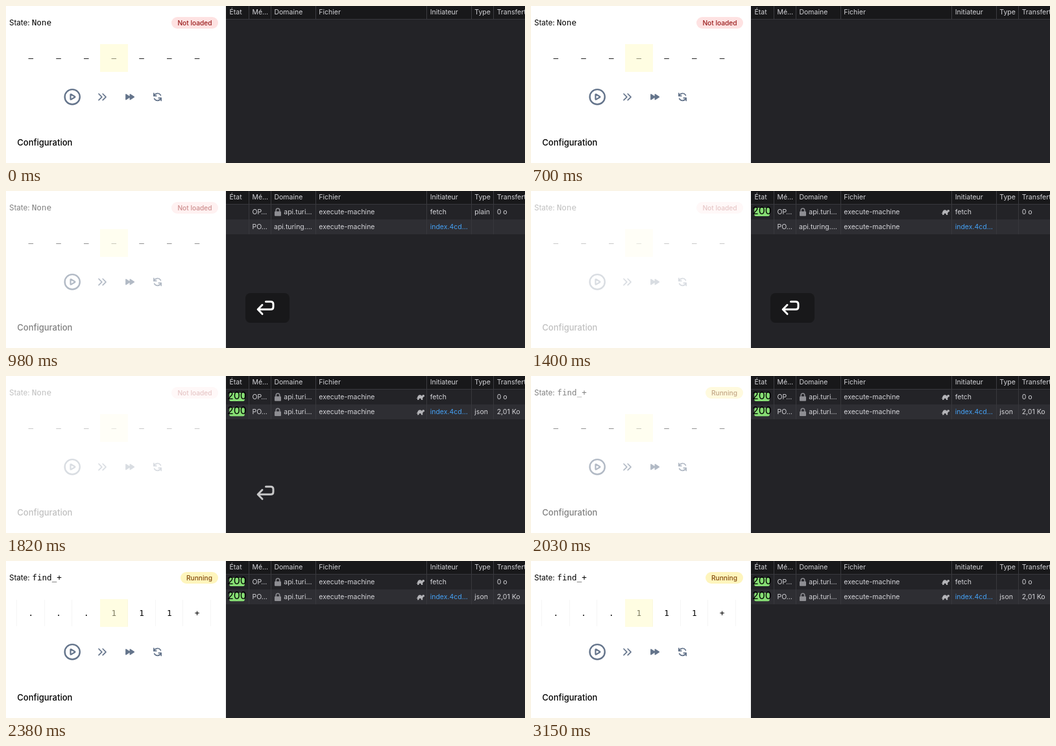
An HTML page that plays this animation: 800 by 243 pixels, repeating every 3.5 s.

```html
<!DOCTYPE html>
<html lang="fr">
<head>
<meta charset="utf-8">
<title>Machine and network panel</title>
<style>
  html, body { margin: 0; width: 100%; height: 100%; overflow: hidden; background: #fff; }
  svg { display: block; width: 100vw; height: 100vh; }
  text { font-family: Inter, "Open Sans", sans-serif; white-space: pre; }
  .mono { font-family: "DejaVu Sans Mono", monospace; font-size: 12.6px; }
  .mid { text-anchor: middle; }
  .state { font-size: 11.6px; }
  .badge { font-size: 10.2px; font-weight: 500; }
  .title { font-size: 13px; font-weight: 500; }
  .icons { fill: none; stroke: #64748b; stroke-width: 1.7; stroke-linecap: round; stroke-linejoin: round; }
  .net text { font-size: 10.5px; fill: #d4d4d8; }
  .net .code { font-size: 10.4px; font-weight: 700; fill: #15201a; }
  .net .link { fill: #45a1f5; }

  /* 2% of the loop is one 70 ms tick */
  .net, .rows, .app, .key, .plate, .sent1, .done1, .sent2, .done2,
  .idle, .running, .blank, .loaded { animation: 3.5s step-end infinite; }
  .app { animation-name: dim; }
  .key { animation-name: press; }
  .plate { animation-name: plate; }
  .rows { animation-name: rows; }
  .sent1 { animation-name: off1; }
  .done1 { animation-name: on1; }
  .sent2 { animation-name: off2; }
  .done2 { animation-name: on2; }
  .idle { animation-name: off3; }
  .running { animation-name: on3; }
  .blank { animation-name: off4; }
  .loaded { animation-name: on4; }

  @keyframes dim {
    0% { opacity: 1; }
    20% { opacity: 1; animation-timing-function: steps(6); }
    32% { opacity: .25; }
    54% { opacity: .25; animation-timing-function: steps(6); }
    66%, 100% { opacity: 1; }
  }
  @keyframes press {
    0% { opacity: 0; }
    22% { opacity: 0; animation-timing-function: steps(2); }
    26% { opacity: 1; }
    50% { opacity: 1; animation-timing-function: steps(4); }
    58%, 100% { opacity: 0; }
  }
  @keyframes plate {
    0% { opacity: 1; }
    46% { opacity: 1; animation-timing-function: steps(3); }
    52%, 100% { opacity: 0; }
  }
  @keyframes rows { 0% { opacity: 0; } 26%, 100% { opacity: 1; } }
  @keyframes off1 { 0% { opacity: 1; } 30%, 100% { opacity: 0; } }
  @keyframes on1 { 0% { opacity: 0; } 30%, 100% { opacity: 1; } }
  @keyframes off2 { 0% { opacity: 1; } 44%, 100% { opacity: 0; } }
  @keyframes on2 { 0% { opacity: 0; } 44%, 100% { opacity: 1; } }
  @keyframes off3 { 0% { opacity: 1; } 56%, 100% { opacity: 0; } }
  @keyframes on3 { 0% { opacity: 0; } 56%, 100% { opacity: 1; } }
  @keyframes off4 { 0% { opacity: 1; } 62%, 100% { opacity: 0; } }
  @keyframes on4 { 0% { opacity: 0; } 62%, 100% { opacity: 1; } }
</style>
</head>
<body>
<svg viewBox="0 0 800 243" preserveAspectRatio="none">
  <defs>
    <g id="lock">
      <path d="M416.2 32v-2.2a2.8 2.8 0 0 1 5.6 0V32" fill="none" stroke="#8e8e93" stroke-width="1.5"/>
      <rect x="414" y="31.5" width="10" height="7.3" rx="1" fill="#8e8e93"/>
    </g>
    <g id="turtle" fill="#b4b4b8">
      <path d="M634 34.2c.3-3.3 2-5 4-5s3.700 1.700 4 5z"/>
      <path d="M641 31.500q.3-2.500 2-2.500 2.200.2 2.200 2.100-.2 1.300-2 1.300l-1.200 2.300h-10q1.500-.4 2.300-1.200z"/>
      <path d="M634.500 34h2.500l-.6 3h-2.400zM639.500 34h2.500l.4 3H640z"/>
    </g>
    <g id="ok">
      <rect x="344.300" y="26" width="23.500" height="13" rx="2.500" fill="#86de74"/>
      <text class="code mid" x="356" y="36.300">200</text>
    </g>
    <path id="cols" d="M374.500 0v20M408.500 0v20M477.500 0v20M648.500 0v20M717.500 0v20M751.500 0v20"/>
  </defs>

  <rect width="340" height="243" fill="#fff"/>
  <g class="app">
    <text class="state" x="5" y="30.200">State:</text>
    <g class="idle">
      <text class="mono" x="39.700" y="30.200">None</text>
      <rect x="255" y="17" width="72" height="18" rx="9" fill="#fee2e2"/>
      <text class="badge mid" x="291" y="29.800" fill="#991b1b">Not loaded</text>
    </g>
    <g class="running">
      <text class="mono" x="40.300" y="30.200">find_+</text>
      <rect x="269" y="17" width="58" height="18" rx="9" fill="#fef5bd"/>
      <text class="badge mid" x="298" y="29.800" fill="#854d0e">Running</text>
    </g>

    <text class="mono mid blank" y="84.500"><tspan x="38.300">–</tspan><tspan x="81">–</tspan><tspan x="123.700">–</tspan><tspan x="166.400">–</tspan><tspan x="209.100">–</tspan><tspan x="251.800">–</tspan><tspan x="294.500">–</tspan></text>
    <g class="loaded">
      <path d="M16.500 60v41M59.500 60v41M101.500 60v41M187.500 60v41M230.500 60v41M272.500 60v41M315.500 60v41" stroke="#f5f5f5"/>
      <text class="mono mid" y="85"><tspan x="38.300">.</tspan><tspan x="81">.</tspan><tspan x="123.700">.</tspan><tspan x="166.400">1</tspan><tspan x="209.100">1</tspan><tspan x="251.800">1</tspan><tspan x="294.500">+</tspan></text>
    </g>
    <rect x="145" y="59" width="43" height="43" fill="#fffbc5" opacity=".5"/>

    <g class="icons">
      <circle cx="102.200" cy="140.700" r="11.600" stroke-width="2.400"/>
      <path d="M99.500 137.300v6.800q0 1 .9.500l5.600-3.300q.8-.6 0-1.200l-5.600-3.300q-.9-.5-.9.500z" stroke-width="2.200"/>
      <path d="M143 136l4.800 4.800-4.800 4.800M149.200 136l4.800 4.800-4.800 4.800"/>
      <path d="M185 137v7.600l5.600-3.800zM191.400 137v7.600l5.800-3.800z" fill="#64748b"/>
      <path d="M227.800 135.200v4h4M239.200 146.400v-4h-4M228.200 139a5.600 5.600 0 0 1 10.200-.8M238.800 142.600a5.600 5.600 0 0 1-10.200.8"/>
    </g>
    <text class="title" x="17.300" y="215.600">Configuration</text>
  </g>

  <g class="net">
    <rect x="339" width="461" height="243" fill="#232327"/>
    <rect x="339" width="461" height="20" fill="#18181a"/>
    <path d="M339 20.500h461" stroke="#38383d"/>
    <use href="#cols" stroke="#3c3c41"/>
    <text y="13.200"><tspan x="344.500">État</tspan><tspan x="379.500">Mé…</tspan><tspan x="413.500">Domaine</tspan><tspan x="482.300">Fichier</tspan><tspan x="653.700">Initiateur</tspan><tspan x="722.300">Type</tspan><tspan x="756.700">Transfert</tspan></text>

    <g class="rows">
      <rect x="339" y="44" width="461" height="23" fill="#2e2e33"/>
      <use href="#cols" transform="translate(0 21) scale(1 2.300)" stroke="#38383d"/>

      <text y="36"><tspan x="379.500">OP…</tspan><tspan x="428.300">api.turi…</tspan><tspan x="482.300">execute-machine</tspan><tspan x="653.700">fetch</tspan><tspan x="756.700">0 o</tspan></text>
      <use href="#lock"/>
      <text class="sent1" x="722.300" y="36">plain</text>
      <g class="done1"><use href="#ok"/><use href="#turtle"/></g>

      <text y="59.200"><tspan x="379.500">PO…</tspan><tspan x="482.300">execute-machine</tspan><tspan class="link" x="653.700">index.4cd…</tspan></text>
      <text class="sent2" x="413" y="59.200">api.turing.…</text>
      <g class="done2">
        <g transform="translate(0 23.200)"><use href="#ok"/><use href="#lock"/><use href="#turtle"/></g>
        <text y="59.200"><tspan x="428.300">api.turi…</tspan><tspan x="722.300">json</tspan><tspan x="756.700">2,01 Ko</tspan></text>
      </g>
    </g>

    <g class="key">
      <rect class="plate" x="369" y="158" width="68" height="46" rx="8" fill="#18181a"/>
      <path d="M400.500 171.300h7.500q4 0 4 4v4q0 4-4 4h-19M395 176.300l-6.800 7 6.800 7" fill="none" stroke="#fff" stroke-width="3" stroke-linecap="round" stroke-linejoin="round"/>
    </g>
  </g>
</svg>
</body>
</html>
```
